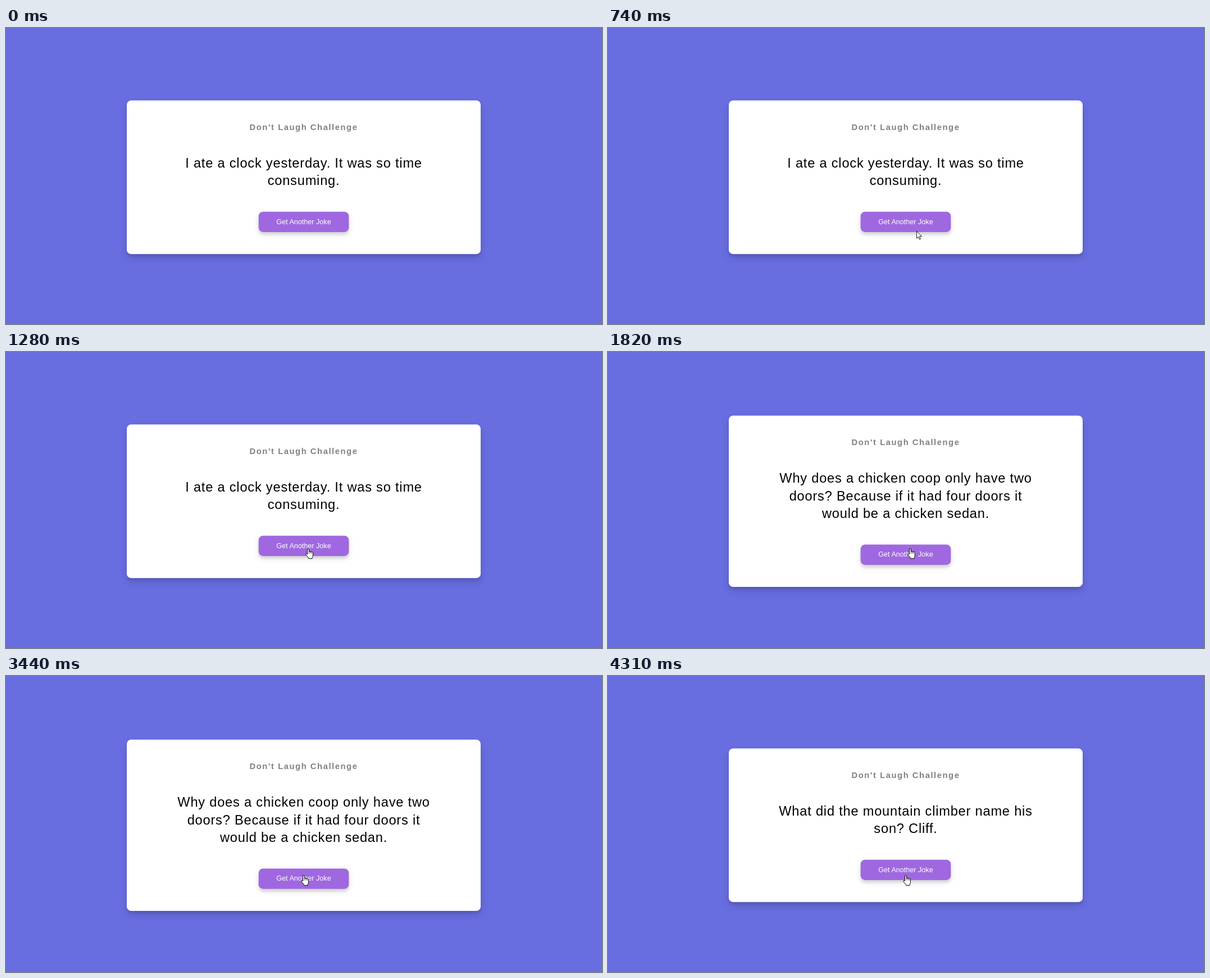
An HTML page for the animation above (6.49 s loop, 1061 by 528 pixels).

```html
<!DOCTYPE html>
<html lang="en">
<head>
<meta charset="utf-8">
<title>Joke card</title>
<style>
html, body { margin: 0; width: 100%; height: 100%; overflow: hidden; background: #686de0; }
body { position: relative; font-family: "Liberation Sans", Arial, sans-serif; text-align: center; }
#card {
  position: absolute; left: 0; top: 0; width: 800px; padding: 50px 0; background: #fff; border-radius: 10px;
  box-shadow: 0 10px 20px rgba(0,0,0,.1), 0 6px 6px rgba(0,0,0,.1);
  transform-origin: 0 0;
  transform: translate(530px, 266.25px) scale(.7875) translate(-50%, -50%);
}
h3 { margin: 0; font-size: 18.72px; line-height: 22px; letter-spacing: 2px; color: #808080; }
#joke { margin: 50px 0; font-size: 30px; line-height: 40px; letter-spacing: 1px; white-space: pre; color: #000; }
#btn {
  margin: 0 auto; width: 204px; height: 46px; border-radius: 10px;
  background: #9f68e0; color: #fff; font-size: 16px; line-height: 46px;
  box-shadow: 0 5px 15px rgba(0,0,0,.1), 0 6px 6px rgba(0,0,0,.1);
}
svg { position: absolute; left: 0; top: 0; fill: #fff; stroke: #000; stroke-linejoin: round; }
</style>
</head>
<body>
<div id="card">
  <h3>Don't Laugh Challenge</h3>
  <div id="joke"></div>
  <div id="btn">Get Another Joke</div>
</div>
<svg width="1061" height="528">
  <path id="arrow" stroke-width=".9" d="M.5.5V13.3L3.4 10.5 5.5 15.2 7.5 14.3 5.4 9.7H9.6Z"/>
  <g id="hand">
    <path d="M3.6 11V2a1.4 1.4 0 0 1 2.8 0V6.4a1.2 1.2 0 0 1 2.4.3a1.2 1.2 0 0 1 2.3.5a1.2 1.2 0 0 1 2.3.8V12.5C13.4 15 12 16 12 18.4H5.6C5.4 15.8 2.5 14.3.8 11.4C.2 9.8 2 9 3.6 11Z"/>
    <path fill="none" stroke-width=".7" d="M6.4 6.4V9.5M8.8 6.7V9.5M11.1 7.2V9.8"/>
  </g>
</svg>
<script>
const LOOP = 6490;
const $ = id => document.getElementById(id);

const jokes = [
  [0, "I ate a clock yesterday. It was so time\nconsuming."],
  [1820, "Why does a chicken coop only have two\ndoors? Because if it had four doors it\nwould be a chicken sedan."],
  [4310, "What did the mountain climber name his\nson? Cliff."]
];

// time, x, y, shape
const moves = [
  [0, 0, 0, ""],
  [260, 993, 507, "arrow"], [330, 930, 494, "arrow"], [400, 822, 464, "arrow"],
  [470, 700, 434, "arrow"], [540, 625, 403, "arrow"], [610, 580, 380, "arrow"],
  [670, 557, 367, "arrow"], [740, 549, 362, "arrow"],
  [810, 536, 352, "hand"], [870, 534, 350, "hand"], [1140, 533, 350, "hand"],
  [3160, 532, 351, "hand"], [3230, 530, 352, "hand"], [3300, 528, 353, "hand"],
  [3370, 526, 354, "hand"], [3440, 525, 355, "hand"]
];

const presses = [[1210, 1280], [3710, 3780]];
const latest = (list, t) => list.findLast(item => item[0] <= t);

function draw(now) {
  const t = now % LOOP;

  const text = latest(jokes, t)[1];
  if ($("joke").textContent !== text) $("joke").textContent = text;

  const pressed = presses.some(([from, to]) => t >= from && t < to);
  $("btn").style.transform = pressed ? "scale(.98)" : "none";

  const [, x, y, shape] = latest(moves, t);
  for (const id of ["arrow", "hand"]) {
    $(id).setAttribute("visibility", id === shape ? "visible" : "hidden");
    $(id).setAttribute("transform", `translate(${x} ${y})`);
  }
}

const start = performance.now();
function tick() {
  draw(performance.now() - start);
  requestAnimationFrame(tick);
}
tick();
</script>
</body>
</html>
```
